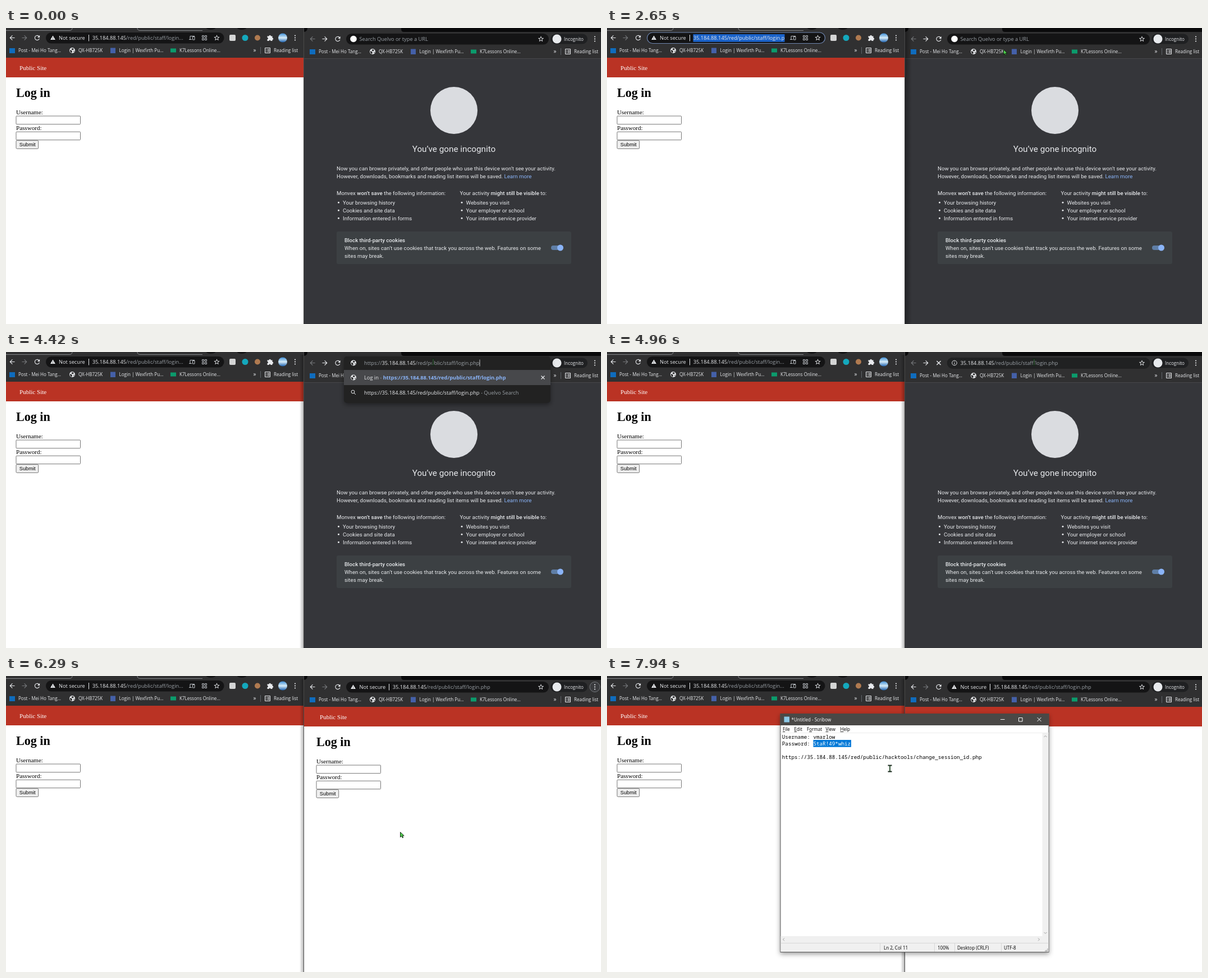
Recreate the animation shown at these times as an HTML page. Size 1060 by 528 pixels, loop 8 s.

```html
<!DOCTYPE html>
<html lang="en">
<head>
<meta charset="utf-8">
<title>Two browser windows</title>
<style>
  html, body { margin: 0; width: 100%; height: 100%; overflow: hidden; background: #fff; }
  svg { display: block; width: 1060px; height: 528px; }
  .ui { font-family: "Open Sans", "Noto Sans", sans-serif; font-size: 8.05px; fill: #e8eaed; }
  .url { font-size: 9.25px; }
  .dim { fill: #9aa0a6; }
  .link { fill: #8ab4f8; }
  .page { font-family: "Liberation Serif", serif; font-size: 11.07px; fill: #000; }
  .page .h1 { font-size: 22.1px; font-weight: 700; }
  .page .btn { font-family: "Liberation Sans", sans-serif; font-size: 9.23px; }
  .private { font-family: Roboto, sans-serif; font-size: 9.69px; fill: #e8eaed; }
  .private .mid { font-weight: 500; }
  .note text { fill: #000; }
  .note .mono { font-family: "Noto Sans Mono", "DejaVu Sans Mono", monospace; font-size: 9.28px; white-space: pre; }
  .note u, .note .u { text-decoration: underline; }
  .line { fill: none; stroke: #e8eaed; }
</style>
</head>
<body>
<svg viewBox="0 0 1060 528">
  <defs>
    <path id="back" transform="scale(.57) translate(-12 -12)" d="M20 11H7.8l5.6-5.6L12 4l-8 8 8 8 1.4-1.4L7.8 13H20z"/>
    <path id="reload" transform="scale(.58) translate(-12 -12)" d="M17.65 6.35A8 8 0 1 0 19.73 14h-2.08A6 6 0 1 1 12 6c1.66 0 3.14.69 4.22 1.78L13 11h7V4z"/>
    <path id="star" transform="scale(.52) translate(-12 -12)" d="M22 9.24l-7.19-.62L12 2 9.19 8.63 2 9.24l5.46 4.73L5.82 21 12 17.27 18.18 21l-1.63-7.03zM12 15.4l-3.76 2.27 1-4.28-3.32-2.88 4.38-.38L12 6.1l1.71 4.04 4.38.38-3.32 2.88 1 4.28z"/>
    <path id="warn" transform="scale(.4) translate(-12 -12)" d="M1 21h22L12 2zm12-3h-2v-2h2zm0-4h-2v-4h2z"/>
    <path id="cross" d="M-3-3L3 3M3-3L-3 3" fill="none" stroke-width="1.2"/>
    <g id="dots"><circle cy="-4" r="1.1"/><circle r="1.1"/><circle cy="4" r="1.1"/></g>
    <g id="globe"><circle r="5" fill="#e8eaed"/><path d="M-4-1l3 1 1 2-1 2.4A5 5 0 0 1-4-1zM0-4l3 1-1 2-2 .4-1.6-1.8zM2 1l2-.4-1 2.6z" fill="#303031"/></g>

    <g id="marks" class="ui">
      <rect x="6" y="36" width="10" height="9" fill="#0f6cbd"/>
      <text x="22" y="43">Post - Mei Ho Tang...</text>
      <use href="#globe" x="118" y="40"/>
      <text x="129" y="43">QX-HB725K</text>
      <rect x="186" y="35.5" width="9" height="9.5" fill="#4460a8"/>
      <text x="201.5" y="43">Login | Wexfirth Pu...</text>
      <rect x="293" y="36.5" width="10" height="7" fill="#0b9b6c"/>
      <text x="309" y="43">K7Lessons Online...</text>
      <text x="440.5" y="43" font-size="10">»</text>
      <path class="line" stroke="#5f6368" d="M453.5 34V46" style="stroke:#5f6368"/>
      <path class="line" d="M461.5 35.5h9v9h-9zM463 38h1M465.5 38h4M463 40h1M465.5 40h4M463 42h1M465.5 42h4"/>
      <text x="477" y="43">Reading list</text>
    </g>

    <g id="login" class="page">
      <rect x="-4" y="53" width="534" height="475" fill="#fff"/>
      <rect x="-4" y="53" width="534" height="35" fill="#ba3324"/>
      <text x="24" y="75" fill="#fff">Public Site</text>
      <text x="18" y="123" class="h1">Log in</text>
      <text x="18" y="154">Username:</text>
      <text x="18" y="182">Password:</text>
      <g fill="#fff" stroke="#767676">
        <rect x="18" y="157" width="114.5" height="14.7" rx="1"/>
        <rect x="18" y="185.2" width="114.5" height="14.5" rx="1"/>
        <rect x="18" y="200.7" width="39.7" height="14.6" rx="1.5" fill="#efefef"/>
      </g>
      <text x="23.8" y="210.8" class="btn">Submit</text>
    </g>

    <linearGradient id="fade"><stop stop-color="#000" stop-opacity=".35"/><stop offset="1" stop-color="#000" stop-opacity="0"/></linearGradient>
    <linearGradient id="fadeLeft"><stop stop-color="#000" stop-opacity="0"/><stop offset="1" stop-color="#000" stop-opacity=".28"/></linearGradient>
    <linearGradient id="avatar" x2="0" y2="1"><stop stop-color="#3f8fd6"/><stop offset=".5" stop-color="#d5ebf7"/><stop offset="1" stop-color="#1d62b0"/></linearGradient>
    <clipPath id="urlClip"><rect x="154" y="8" width="162.5" height="20"/></clipPath>
    <clipPath id="chipClip"><rect x="606" y="8" width="65" height="24"/></clipPath>
    <filter id="soft" x="-10%" y="-10%" width="120%" height="125%"><feDropShadow dx="0" dy="3" stdDeviation="4" flood-opacity=".4"/></filter>
  </defs>

  <!-- left window -->
  <use href="#login"/>
  <rect width="531" height="53" fill="#303031"/>
  <path class="line" style="stroke:#85878a" d="M0 4.5H113q5 0 5-5M234 0q0 4.5 5 4.5H350"/>
  <path fill="#131314" d="M357 0a8 3 0 0 0 16 0zM412 0a8 3 0 0 0 16 0z"/>
  <g fill="#e8eaed">
    <use href="#back" x="0" transform="translate(11 17.5)"/>
    <use href="#back" transform="translate(33 17.5) scale(-1 1)" fill="#76787b"/>
    <use href="#reload" transform="translate(55.5 17.5)"/>
  </g>
  <rect x="71" y="8" width="317.5" height="19.5" rx="9.75" fill="#141415"/>
  <rect data-on="1410-1810" x="71" y="8" width="317.5" height="19.5" rx="9.75" fill="#202122"/>
  <rect data-on="1810-3550" x="71.5" y="8" width="317" height="19.5" rx="9.75" fill="none" stroke="#6f86b0" stroke-width="1.2"/>
  <rect data-on="1890-3550" x="153.5" y="11" width="163" height="13.8" fill="#1a62c9"/>
  <g class="ui url">
    <use href="#warn" transform="translate(83.5 17.5)"/>
    <text x="94" y="21">Not secure</text>
    <path class="line" d="M147.5 12V23.5"/>
    <text x="153.7" y="21" data-on="0-1810 3550-8000">35.184.88.145<tspan class="dim">/red/public/staff/login...</tspan></text>
    <text x="153.7" y="21" data-on="1810-3550" clip-path="url(#urlClip)">35.184.88.145/red/public/staff/login.php</text>
  </g>
  <path class="line" style="stroke:#bdc1c6" d="M328 20.5h-2M328 20.5V14.5h8M332.500 15.500h3.500v5.500h-3.500zM326 20.500h5"/>
  <path class="line" style="stroke:#bdc1c6" d="M349.500 13.500h3v3h-3zM354.500 13.500h3v3h-3zM349.500 18.500h3v3h-3zM354.500 18.500h3v3h-3z"/>
  <use href="#star" transform="translate(375.5 17.5)" fill="#e8eaed"/>
  <rect x="398" y="12" width="11" height="11" rx="2" fill="#d4d5d5"/>
  <circle cx="426" cy="17.500" r="5.500" fill="#14a8bd"/>
  <circle cx="448" cy="17.500" r="5" fill="#b07a50"/>
  <path fill="#e8eaed" d="M465.500 14.500h3a1.700 1.700 0 0 1 3.400 0h2.600v3a1.700 1.700 0 0 1 0 3.400v2h-3a1.500 1.500 0 0 0-3 0h-3v-3a1.500 1.500 0 0 0 0-3z"/>
  <circle cx="493" cy="17.500" r="8" fill="url(#avatar)"/>
  <use href="#dots" x="515" y="17.500" fill="#e8eaed"/>
  <use href="#marks"/>

  <!-- right window -->
  <g data-on="0-5040">
    <rect x="531" y="54" width="529" height="474" fill="#35363a"/>
    <g class="private">
      <circle cx="798" cy="147" r="42" fill="#dadce0"/>
      <text x="798" y="221" text-anchor="middle" font-size="15.25">You’ve gone incognito</text>
      <text x="589" y="253.500">Now you can browse privately, and other people who use this device won’t see your activity.</text>
      <text x="589" y="267.500">However, downloads, bookmarks and reading list items will be saved. <tspan class="link">Learn more</tspan></text>
      <text x="589" y="298">Monvex <tspan class="mid">won’t save</tspan> the following information:</text>
      <text x="808.500" y="298">Your activity <tspan class="mid">might still be visible</tspan> to:</text>
      <g id="bullets"></g>
      <rect x="589" y="363" width="418" height="58" rx="3" fill="#3c4043"/>
      <text x="603" y="381.500" class="mid">Block third-party cookies</text>
      <text x="603" y="395.500">When on, sites can’t use cookies that track you across the web. Features on some</text>
      <text x="603" y="409.500">sites may break.</text>
      <rect x="971" y="388" width="21" height="8" rx="4" fill="#5f7ea6"/>
      <circle cx="987.500" cy="392" r="5.500" fill="#8ab4f8"/>
    </g>
  </g>
  <use href="#login" x="535" y="2" data-on="5040-8000"/>
  <rect x="531" width="529" height="55" fill="#303031"/>
  <path d="M531 54.500H1060" stroke="#47484a" data-on="0-5040"/>
  <path d="M531 0h6q0 6-6 7zM704 0h356v7H709q-5 0-5-5z" fill="#0a0a0b"/>
  <g fill="#e8eaed">
    <g data-on="0-5040">
      <use href="#back" transform="translate(546 19.500)" fill="#76787b"/>
      <use href="#back" transform="translate(568 19.500) scale(-1 1)"/>
    </g>
    <g data-on="5040-8000">
      <use href="#back" transform="translate(546 19.500)"/>
      <use href="#back" transform="translate(568 19.500) scale(-1 1)" fill="#76787b"/>
    </g>
    <use href="#reload" transform="translate(591 19.500)" data-on="0-4880 5040-8000"/>
    <use href="#cross" transform="translate(591 19.500) scale(1.200)" stroke="#e8eaed" data-on="4880-5040"/>
  </g>
  <use href="#marks" x="535" y="2"/>
  <rect x="606" y="10" width="361" height="19.500" rx="9.750" fill="#141415"/>
  <rect data-on="3050-3550 4800-5600" x="606" y="10" width="361" height="19.500" rx="9.750" fill="#202122"/>
  <rect data-on="3550-4420" x="606.500" y="10" width="360" height="19.500" rx="9.750" fill="none" stroke="#6f86b0" stroke-width="1.200"/>
  <use href="#star" transform="translate(953 19.500)" fill="#e8eaed"/>
  <rect x="970" y="10.500" width="66" height="18" rx="9" fill="#1f2022"/>
  <circle cx="981.500" cy="19.500" r="8" fill="#e8eaed"/>
  <text x="994" y="22.500" class="ui">Incognito</text>
  <circle data-on="6290-7310" cx="1049" cy="19.500" r="9" fill="#3a3b3e" stroke="#85888d" stroke-width=".8"/>
  <use href="#dots" x="1049" y="19.500" fill="#e8eaed"/>

  <g class="ui url">
    <g data-on="0-4340">
      <circle cx="619" cy="19.500" r="5.800" fill="#fff"/>
      <text x="629.500" y="23" class="dim">Search Quelvo or type a URL</text>
    </g>
    <path data-on="3630-4030" d="M629.500 13.500v12" stroke="#e8eaed" stroke-width=".8"/>
    <g data-on="4420-4800">
      <rect x="602" y="8" width="368" height="83" rx="5" fill="#202124" filter="url(#soft)"/>
      <rect x="602" y="32" width="368" height="27" fill="#47484b"/>
      <use href="#globe" x="619" y="45.500"/>
      <text x="638" y="49">Log in <tspan class="dim">-</tspan> <tspan class="link" font-weight="700">https://35.184.88.145/red/public/staff/login.php</tspan></text>
      <use href="#cross" x="956.500" y="45.500" stroke="#e8eaed"/>
      <circle cx="618" cy="71" r="2.900" class="line"/>
      <path class="line" d="M620 73l3 3"/>
      <text x="638" y="75.700">https://35.184.88.145/red/public/staff/login.php<tspan class="dim"> - Quelvo Search</tspan></text>
    </g>
    <g data-on="4340-4800">
      <use href="#globe" x="619" y="19.500"/>
      <text x="638" y="23" class="dim">https://<tspan fill="#e8eaed">35.184.88.145</tspan>/red/public/staff/login.php</text>
      <path d="M844 13.500v12" stroke="#e8eaed" stroke-width=".8"/>
    </g>
    <g data-on="4800-5040">
      <circle cx="619" cy="19.500" r="4.300" class="line"/>
      <path class="line" d="M619 19v3M619 17v1"/>
    </g>
    <g data-on="5040-8000">
      <use href="#warn" transform="translate(618.500 19.500)"/>
      <text x="629.500" y="23" clip-path="url(#chipClip)" data-on="5040-5110">Not secure</text>
      <text x="629.500" y="23" data-on="5110-8000">Not secure</text>
      <path id="sep" class="line" d="M.5 14V25.500"/>
    </g>
    <text id="address" y="23" data-on="4800-8000">35.184.88.145<tspan class="dim">/red/public/staff/login.php</tspan></text>
  </g>

  <rect x="530" width="1" height="528" fill="#4a4a4a"/>
  <rect data-on="1810-3550" x="531" width="12" height="528" fill="url(#fade)"/>
  <rect data-on="3550-8000" x="523" y="5" width="7" height="523" fill="url(#fadeLeft)"/>

  <!-- text editor -->
  <g id="note" class="note ui" data-on="7310-8000">
    <rect x="309" y="67.500" width="478" height="425" fill="#fff" stroke="#555" filter="url(#soft)"/>
    <rect x="308.500" y="67" width="479" height="21" fill="#4a4846"/>
    <rect x="315.500" y="72.500" width="9.500" height="10" fill="#8cc8e6"/>
    <text x="328.500" y="80.800" style="fill:#fff">*Untitled - Scribow</text>
    <path class="line" style="stroke:#fff" d="M701 77.500h7.500M733.500 74.500h6.500v6.500h-6.500zM766.500 74l7 7M773.500 74l-7 7"/>
    <text x="313" y="98"><tspan class="u">F</tspan>ile</text>
    <text x="333.500" y="98"><tspan class="u">E</tspan>dit</text>
    <text x="356" y="98">F<tspan class="u">o</tspan>rmat</text>
    <text x="389.500" y="98"><tspan class="u">V</tspan>iew</text>
    <text x="415.500" y="98"><tspan class="u">H</tspan>elp</text>
    <path d="M309 101.500H787" stroke="#ececec"/>
    <path d="M775.500 102h11v390h-477v-28h466z" fill="#f0f0f0"/>
    <path d="M309.500 476.500h477M486.500 477v15M583.500 477v15M619.500 477v15M702.500 477v15" stroke="#d7d7d7"/>
    <path class="line" style="stroke:#a0a0a0" d="M778.500 109l2.500-2.500 2.500 2.500M778.500 457l2.500 2.500 2.500-2.500M316 467.500l-2.500 2.500 2.500 2.500M768 467.500l2.500 2.500-2.500 2.500"/>
    <path d="M785 486v4M782.500 488.500v2M780 490.500h5" stroke="#b0b0b0" stroke-width="1.300"/>
    <text x="493" y="487.800">Ln 2, Col 11</text>
    <text x="589" y="487.800">100%</text>
    <text x="624" y="487.800">Desktop (CRLF)</text>
    <text x="707" y="487.800">UTF-8</text>
    <rect x="367.500" y="114" width="67.500" height="12.700" fill="#0078d7"/>
    <text class="mono" x="311.800" y="111.500">Username: vmarlow</text>
    <text class="mono" x="311.800" y="123.700">Password: <tspan fill="#fff">StaR!49*whiz</tspan></text>
    <text class="mono" x="311.800" y="148.300">https://35.184.88.145/red/public/hacktools/change_session_id.php</text>
    <path data-on="7380-7940" d="M367.500 114v13" stroke="#000"/>
  </g>

  <g id="cursor" data-on="210-7310 7380-8000">
    <path id="arrow" d="M.5.500V9.500L2.700 7.500l1.600 3.300 1.400-.7L4.200 6.900h3z" fill="#4fd04f" stroke="#0c200c" stroke-width=".9"/>
    <g id="beam" fill="none">
      <path d="M-3.500-5.500H-1Q0-5.500 0-4.500V4.500Q0 5.500-1 5.500H-3.500M3.500-5.500H1Q0-5.500 0-4.500M0 4.500Q0 5.500 1 5.500H3.500" stroke="#16261a" stroke-width="1.800"/>
      <path d="M0-5V5" stroke="#58a058" stroke-width=".6"/>
    </g>
  </g>
</svg>
<script>
const LOOP = 8000;
const $ = id => document.getElementById(id);

const lists = [
  [592.5, 600, ['Your browsing history', 'Cookies and site data', 'Information entered in forms']],
  [812, 819.5, ['Websites you visit', 'Your employer or school', 'Your internet service provider']]
];
$('bullets').innerHTML = lists.map(([dot, x, rows]) => rows.map((row, i) =>
  `<circle cx="${dot}" cy="${311.2 + 14 * i}" r="1.5"/><text x="${x}" y="${314.5 + 14 * i}">${row}</text>`
).join('')).join('');

// elements shown only during their "from-to" ranges
const timed = [...document.querySelectorAll('[data-on]')].map(el => ({
  el, spans: el.dataset.on.split(' ').map(s => s.split('-').map(Number))
}));

// pointer moves: start, end, number of steps, x, y
const moves = [
  [210, 210, 1, 617, 291],
  [290, 290, 1, 481, 196],
  [530, 1170, 9, 192, 30],
  [1410, 1580, 3, 233, 19],
  [2650, 2650, 1, 706, 38],
  [2732, 3310, 8, 757, 19],
  [4030, 4030, 1, 761, 18],
  [5600, 5750, 3, 702, 278],
  [6520, 6840, 5, 645, 490],
  [7380, 7380, 1, 520, 229],
  [7700, 7780, 2, 504, 165]
];
const ease = p => p * p * (3 - 2 * p);

function pointer(t) {
  let x = 617, y = 291;
  for (const [from, to, n, nx, ny] of moves) {
    if (t < from) break;
    const step = t >= to ? n : 1 + Math.floor((t - from) / (to - from) * (n - 1));
    const p = ease(step / n);
    x += (nx - x) * p;
    y += (ny - y) * p;
  }
  return [x, y];
}

function render(t) {
  for (const { el, spans } of timed)
    el.style.display = spans.some(([a, b]) => t >= a && t < b) ? '' : 'none';

  const [x, y] = pointer(t);
  const beam = y < 29 || t >= 7380;
  $('cursor').setAttribute('transform', `translate(${x} ${y})`);
  $('beam').style.display = beam ? '' : 'none';
  $('arrow').style.display = beam ? 'none' : '';

  const left = t < 5040 ? 629.5 : t < 5110 ? 682.7 : 688.7;
  $('address').setAttribute('x', left);
  $('sep').setAttribute('transform', `translate(${left - 6.7} 0)`);
  $('note').style.opacity = t < 7380 ? .6 : 1;
}

const start = performance.now();
(function frame() {
  render((performance.now() - start) % LOOP);
  requestAnimationFrame(frame);
})();
</script>
</body>
</html>
```
